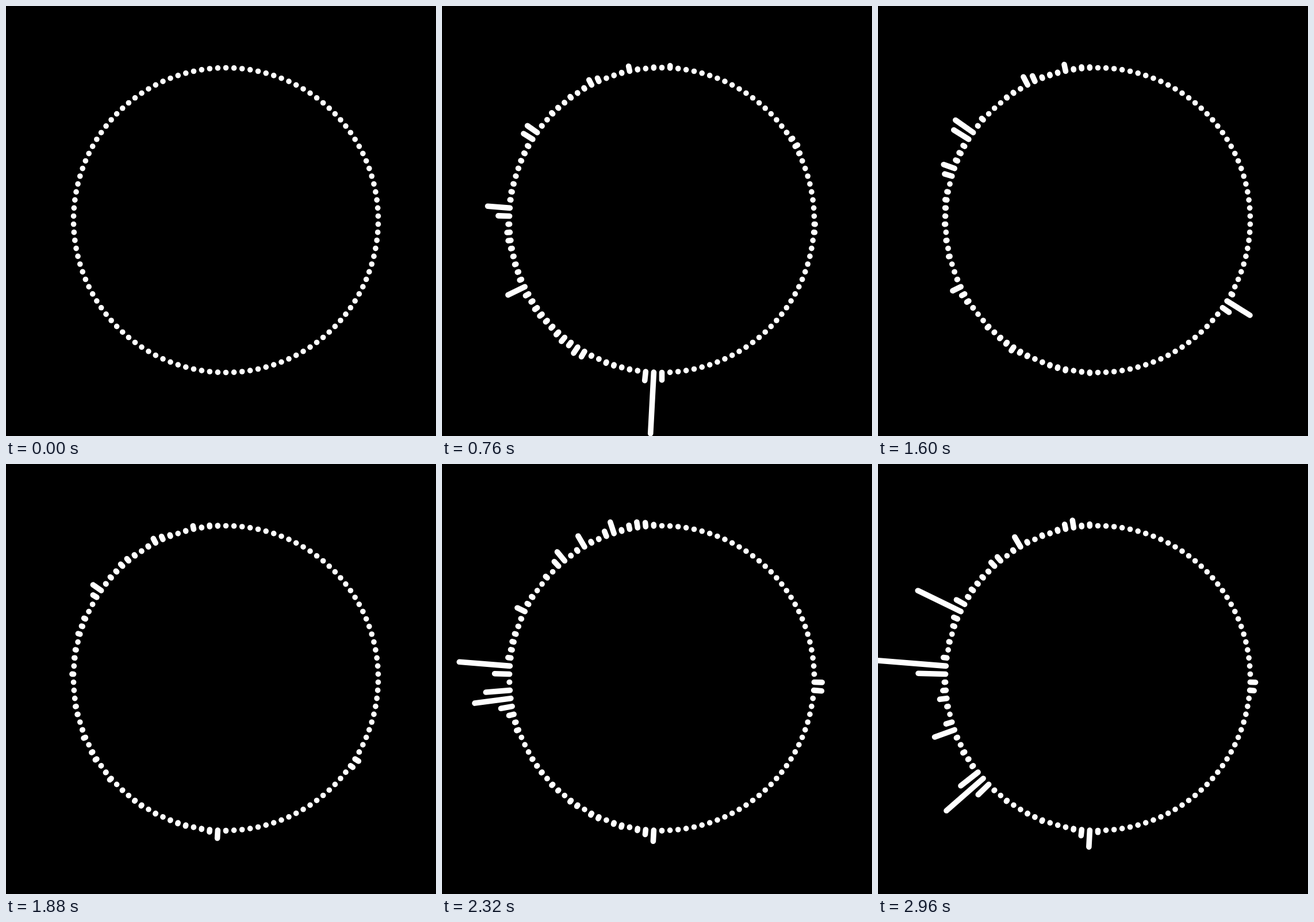
An HTML page for the animation above (3000 ms loop, 748 by 748 pixels).

```html
<!DOCTYPE html>
<html lang="en">
<head>
<meta charset="utf-8">
<title>Circular spectrum</title>
<style>
  html, body { margin: 0; width: 100%; height: 100%; overflow: hidden; background: #000; }
  svg { display: block; width: 100%; height: 100%; }
  path { stroke: #fff; stroke-width: 9.6; stroke-linecap: round; fill: none; }
</style>
</head>
<body>
<svg id="stage" viewBox="0 0 748 748"></svg>
<script>
const LOOP = 3000, STEP = 40;
const COUNT = 118, CX = 382.5, CY = 372.5, RADIUS = 265;
const PEAK_WIDTH = 0.7, BEAT_WIDTH = 160;

// A peak is [position in bars clockwise from the top, height, optional width].
// A position between two bars shares the peak between them.
const chords = [
  { at: 0, peaks: [] },
  { at: 400, peaks: [
    [30.5, 6], [60.2, 13], [72, 14, 2.5], [76.5, 11, 1.6], [80, 43],
    [86.5, 7, 2.5], [89.75, 60], [99.5, 49], [109.5, 11], [114, 11]] },
  { at: 1120, peaks: [
    [1, 8], [19.8, 10, 1.2], [60.1, 26], [69.5, 30], [79.8, 24],
    [89.55, 38], [99.6, 17], [109.3, 16], [114, 7]] },
  { at: 1600, peaks: [
    [40.2, 51], [70.3, 9], [79.75, 18], [94.6, 28], [99.55, 57],
    [109.4, 22], [114, 12]] },
  { at: 1880, peaks: [
    [40.4, 10], [60.2, 15], [99.7, 21], [104.5, 8], [109.4, 12], [114, 6]] },
  { at: 2320, peaks: [
    [30.5, 23], [60.3, 23], [84.7, 24], [86.4, 88], [89.8, 96], [97.1, 15],
    [104.65, 26], [108, 22], [111.7, 25], [115, 10, 1.7]] },
  { at: 2960, peaks: [
    [30.45, 14], [60.25, 33], [75.1, 86, 1], [82.2, 40], [86.3, 15],
    [89.75, 150], [97.1, 85], [104.5, 15], [108, 20], [114.6, 18]] }
];

// Short beats between the chords: [time, position, height].
const beats = [
  [200, 90, 45], [200, 114, 30], [760, 60, 88], [1400, 40, 66],
  [2080, 30.3, 100], [2080, 60, 54], [2080, 90, 70], [2600, 60, 42]
];

const bell = (distance, width) => Math.exp(-((distance / width) ** 2));
const random = seed => {
  const x = Math.sin(seed * 127.1) * 43758.5453;
  return x - Math.floor(x);
};

// The low half of the spectrum never falls quite silent.
const murmur = (i, k) => (i >= COUNT / 2 && k > 0 ? 4 * random(i + COUNT * k) ** 2 : 0);

const spectra = chords.map(({ peaks }, k) =>
  Array.from({ length: COUNT }, (_, i) =>
    Math.max(murmur(i, k), ...peaks.map(([pos, height, width = PEAK_WIDTH]) =>
      height * bell(i - pos, width)))));

function levelAt(i, time) {
  const next = Math.max(1, chords.findIndex(chord => chord.at >= time));
  const from = chords[next - 1].at, to = chords[next].at;
  const u = (time - from) / (to - from);
  const mix = next === 1 ? 1 - (1 - u) ** 2 : u;
  let level = spectra[next - 1][i] * (1 - mix) + spectra[next][i] * mix;
  for (const [at, pos, height] of beats) {
    const d = Math.min(1, Math.abs(time - at) / BEAT_WIDTH);
    level += height * bell(i - pos, PEAK_WIDTH) * Math.cos(d * Math.PI / 2) ** 2;
  }
  return Math.max(level, 0.01);
}

const stage = document.getElementById("stage");
const bars = Array.from({ length: COUNT }, (_, i) => {
  const angle = i * 2 * Math.PI / COUNT;
  const path = document.createElementNS("http://www.w3.org/2000/svg", "path");
  stage.append(path);
  return { path, dx: Math.sin(angle), dy: -Math.cos(angle) };
});

function draw(time) {
  bars.forEach(({ path, dx, dy }, i) => {
    const point = r => `${(CX + r * dx).toFixed(2)} ${(CY + r * dy).toFixed(2)}`;
    path.setAttribute("d", `M${point(RADIUS)}L${point(RADIUS + levelAt(i, time))}`);
  });
}

const start = performance.now();
function tick() {
  const time = (performance.now() - start) % LOOP;
  draw(Math.floor(time / STEP) * STEP);
  requestAnimationFrame(tick);
}
draw(0);
requestAnimationFrame(tick);
</script>
</body>
</html>
```
